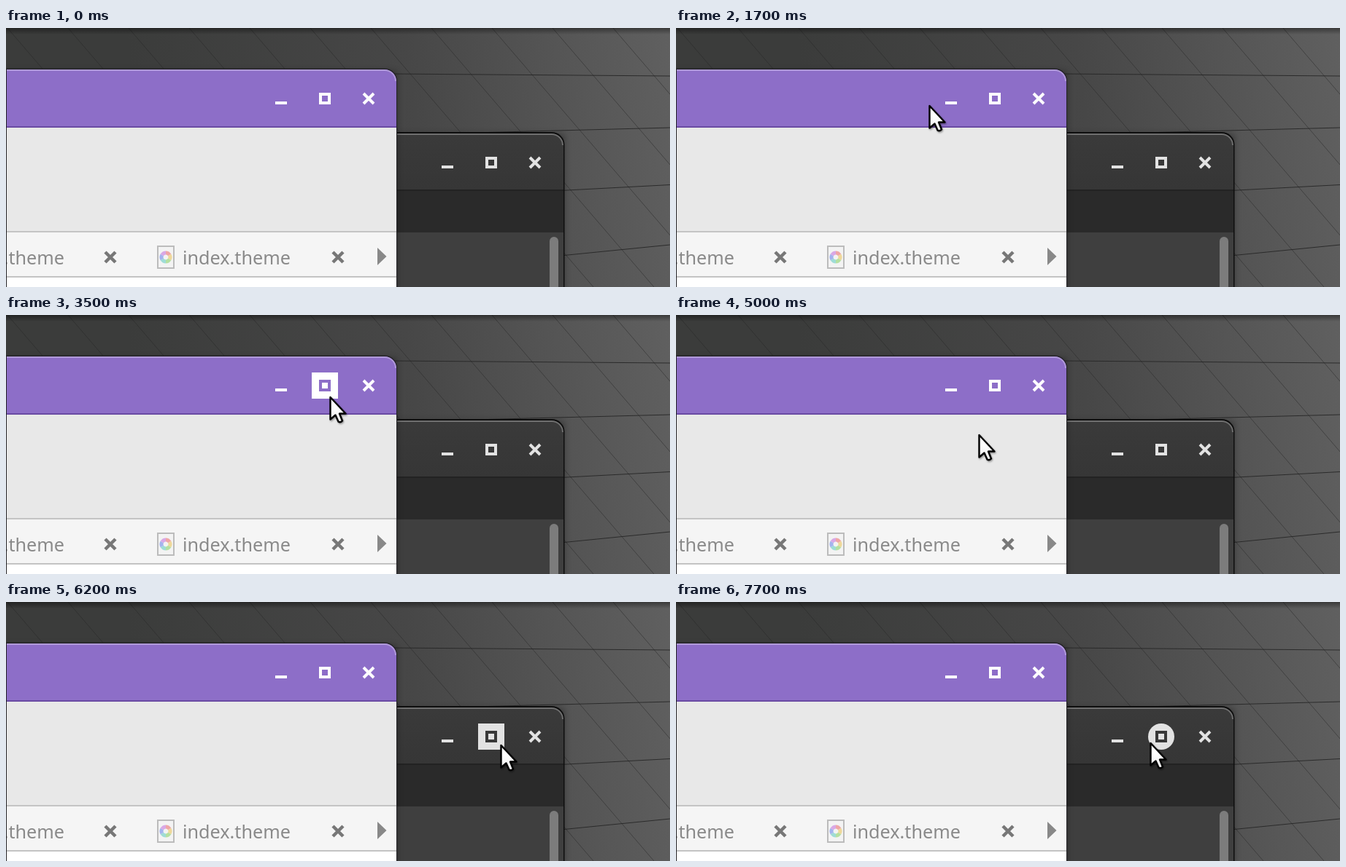
These frames come from a looping animation (910 px wide and 356 px high, 8000 ms). An HTML page:

```html
<!DOCTYPE html>
<html lang="en">
<head>
<meta charset="utf-8">
<title>Window buttons</title>
<style>
  html, body { margin: 0; width: 100%; height: 100%; overflow: hidden; background: #444; }
  svg { display: block; width: 910px; height: 356px; }
  text { font: 25.2px "Noto Sans", "Open Sans", sans-serif; fill: #8a8a8a; }
  .glyph { fill: none; stroke: var(--ink); stroke-width: 4; }
  .plate { fill: var(--ink); visibility: hidden; }
  .hover .plate { visibility: visible; }
  .hover .glyph { stroke: var(--bar); }
  .light { --ink: #fff; --bar: #8d6ec8; }
  .dark { --ink: #e2e2e2; --bar: #383838; }
</style>
</head>
<body>
<svg viewBox="0 0 910 356">
  <defs>
    <linearGradient id="wall" gradientUnits="userSpaceOnUse" x1="180" y1="120" x2="930" y2="20">
      <stop offset="0" stop-color="#3b3c3b"/>
      <stop offset=".5" stop-color="#474747"/>
      <stop offset="1" stop-color="#616161"/>
    </linearGradient>
    <linearGradient id="edge" x2="0" y2="1">
      <stop offset="0" stop-opacity=".4"/>
      <stop offset="1" stop-opacity="0"/>
    </linearGradient>
    <linearGradient id="darkBar" x2="0" y2="1">
      <stop offset="0" stop-color="#3a3a3a"/>
      <stop offset="1" stop-color="#363636"/>
    </linearGradient>
    <linearGradient id="arrow" x2="0" y2="1">
      <stop offset=".4" stop-color="#fff"/>
      <stop offset="1" stop-color="#ececec"/>
    </linearGradient>
    <filter id="soft" x="-10%" y="-10%" width="120%" height="120%">
      <feGaussianBlur stdDeviation="5"/>
    </filter>
    <filter id="drop" x="-20%" y="-20%" width="150%" height="150%">
      <feDropShadow dx="1" dy="1.5" stdDeviation="1" flood-opacity=".4"/>
    </filter>
    <clipPath id="lightClip"><path d="M1 357V57H519a16 16 0 0 1 16 16V357Z"/></clipPath>
    <clipPath id="darkClip"><path d="M500 357V145H748a16 16 0 0 1 16 16V357Z"/></clipPath>
  </defs>

  <rect width="910" height="356" fill="url(#wall)"/>
  <g id="grid" stroke="#262626" stroke-opacity=".5" fill="none">
    <path d="M530 63L910 66M640 144L910 137M750 224L910 215.500M750 314L910 298" stroke-opacity=".9"/>
  </g>
  <rect width="910" height="9" fill="url(#edge)"/>

  <path d="M500 360V146H765V360Z" opacity=".35" filter="url(#soft)"/>
  <path d="M500 357V143H748a17.500 17.500 0 0 1 17.500 17.500V357Z" fill="#0e0e0e"/>
  <g clip-path="url(#darkClip)">
    <rect x="500" y="145" width="264" height="78" fill="url(#darkBar)"/>
    <path d="M500 146H748a15 15 0 0 1 15 15" fill="none" stroke="#707070" stroke-width="2"/>
    <rect x="500" y="222" width="264" height="2" fill="#222"/>
    <rect x="500" y="224" width="264" height="57" fill="#2a2a2a"/>
    <rect x="500" y="281" width="264" height="76" fill="#3f3f3f"/>
    <rect x="745" y="287" width="12" height="90" rx="6" fill="#7c7c7c"/>
  </g>

  <path d="M-20 370V60H535V370Z" opacity=".4" filter="url(#soft)"/>
  <path d="M0 357V55.500H519a17 17 0 0 1 17 17V357Z" fill="#252428"/>
  <g clip-path="url(#lightClip)">
    <rect x="1" y="57" width="534" height="80" fill="#8d6ec8"/>
    <path d="M1 58H519a15 15 0 0 1 15 15" fill="none" stroke="#b09ad9" stroke-width="2"/>
    <rect x="1" y="135" width="534" height="2" fill="#6a4ba3"/>
    <rect x="1" y="137" width="534" height="143" fill="#e8e8e8"/>
    <rect x="1" y="279" width="534" height="64" fill="#c4c4c4"/>
    <rect x="1" y="281" width="534" height="60" fill="#f5f5f5"/>
    <rect x="1" y="343" width="534" height="14" fill="#fff"/>
    <text x="80" y="325" text-anchor="end">.theme</text>
    <text x="242" y="325">index.theme</text>
    <path d="M136 308l14 14m0-14l-14 14M448 308l14 14m0-14l-14 14" stroke="#777" stroke-width="4.500"/>
    <path d="M509 302L521.500 314L509 326Z" fill="#888"/>
    <rect x="208" y="300" width="22" height="30" fill="#f3f3f3" stroke="#bcbcbc" stroke-width="2"/>
    <g id="wheel" transform="translate(219 315)" fill="none" stroke-width="5"/>
  </g>

  <g id="buttons"></g>

  <g id="cursor" filter="url(#drop)">
    <path d="M1.500 3V33.500L8.500 27.500L12.500 36.500Q15 38.500 18 35.500L14 25.500H22.500Z"
      fill="url(#arrow)" stroke="#000" stroke-width="2.400" stroke-linejoin="round"/>
  </g>
</svg>
<script>
const LOOP = 8000, STEP = 100;
const $ = id => document.getElementById(id);
const add = (parent, name, attrs) => {
  const el = document.createElementNS("http://www.w3.org/2000/svg", name);
  for (const k in attrs) el.setAttribute(k, attrs[k]);
  return parent.appendChild(el);
};

for (let x = -360; x < 910; x += 83)
  add($("grid"), "path", { d: `M${x + 30} 0L${x + 335} 356` });

["#efa6a6", "#efd89a", "#b5e0a0", "#9fdcd6", "#a5b4ee", "#d9a8e6"].forEach((stroke, i) =>
  add($("wheel"), "path", { d: "M0 -6A6 6 0 0 1 5.200 -3", stroke, transform: `rotate(${i * 60})` }));

const GLYPHS = ["M-8 6H8", "M-6 -6H6V6H-6Z", "M-7 -7L7 7M7 -7L-7 7"];
const buttons = [];
function addButtons(cls, x0, y) {
  GLYPHS.forEach((d, i) => {
    const x = x0 + i * 60;
    const g = add($("buttons"), "g", { class: cls, transform: `translate(${x} ${y})` });
    const plate = add(g, "rect", { class: "plate", x: -18, y: -18, width: 36, height: 36 });
    add(g, "path", { class: "glyph", d });
    buttons.push({ g, plate, x, y });
  });
}
addButtons("light", 377, 97);
addButtons("dark", 605, 185);

// Cursor moves: first step, last step, end x, end y, sag
const moves = [
  [500, 600, 56, 108, 0],
  [900, 1700, 346, 104, 8],
  [1800, 2400, 433, 104, 0],
  [3200, 3300, 482, 107, 0],
  [3400, 3500, 443, 110, 0],
  [4300, 4600, 408, 158, 0],
  [5000, 5000, 414, 162, 0],
  [5100, 5500, 592, 197, 0],
  [5800, 5800, 582, 198, 0],
  [5900, 6200, 677, 194, 0],
  [6300, 6400, 728, 195, 0],
  [6500, 6600, 716, 192, 0],
  [6700, 7100, 638, 191, 0],
  [7400, 7600, 649, 191, 0]
];
const presses = [[3800, 4300], [7700, 8000]];
const ease = p => p * p * (3 - 2 * p);

function cursorAt(t) {
  let x = -40, y = 108;
  for (const [from, to, ex, ey, sag] of moves) {
    if (t < from) break;
    const p = Math.min(1, (t - from + STEP) / (to - from + STEP)), k = ease(p);
    x += (ex - x) * k;
    y += (ey - y) * k + sag * Math.sin(Math.PI * p);
  }
  return [Math.round(x), Math.round(y)];
}

function draw(now) {
  const t = Math.floor(now % LOOP / STEP) * STEP;
  const [x, y] = cursorAt(t);
  const pressed = presses.some(([a, b]) => t >= a && t < b);
  $("cursor").setAttribute("transform", `translate(${x} ${y})`);
  for (const b of buttons) {
    const over = Math.abs(x - b.x) <= 18 && Math.abs(y - b.y) <= 18;
    b.g.classList.toggle("hover", over);
    b.plate.setAttribute("rx", over && pressed ? 18 : 0);
  }
  requestAnimationFrame(() => draw(performance.now()));
}
draw(performance.now());
</script>
</body>
</html>
```
